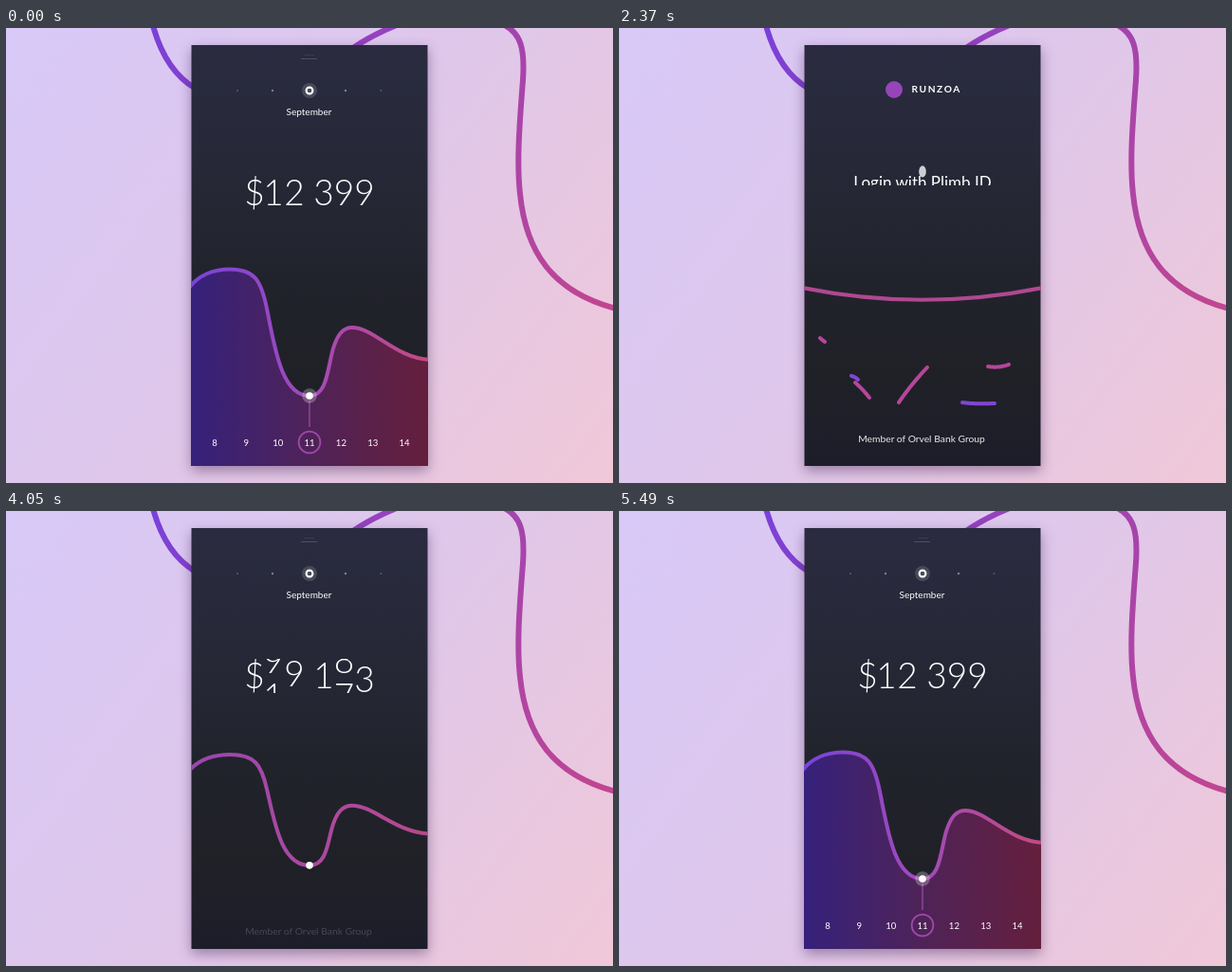
These frames come from a looping animation (640x480 px, 6090 ms). An HTML page:

```html
<!DOCTYPE html>
<html lang="en">
<head>
<meta charset="utf-8">
<title>Finance app login</title>
<style>
  html, body { margin: 0; width: 100%; height: 100%; overflow: hidden; }
  body { background: linear-gradient(115deg, #d8c9f8, #efc7d9); }
  svg { display: block; width: 640px; height: 480px; }
  text { font-family: Lato, sans-serif; fill: #fff; text-anchor: middle; }
  .round { fill: none; stroke-linecap: round; stroke-linejoin: round; }
  .card { filter: drop-shadow(0 5px 7px rgba(50, 20, 70, .42)); }
</style>
</head>
<body>
<svg viewBox="0 0 640 480">
  <defs>
    <linearGradient id="bg" gradientUnits="userSpaceOnUse" x1="0" y1="0" x2="640" y2="480">
      <stop stop-color="#d8c9f8"/><stop offset=".5" stop-color="#dfc7ea"/><stop offset="1" stop-color="#f0c8d8"/>
    </linearGradient>
    <linearGradient id="cable" gradientUnits="userSpaceOnUse" x1="150" y1="0" x2="640" y2="296">
      <stop stop-color="#7a40d8"/><stop offset="1" stop-color="#c24690"/>
    </linearGradient>
    <linearGradient id="panel" x2="0" y2="1">
      <stop stop-color="#2a2b40"/><stop offset=".25" stop-color="#272939"/>
      <stop offset=".55" stop-color="#21232c"/><stop offset=".78" stop-color="#202127"/>
      <stop offset="1" stop-color="#1c1d29"/>
    </linearGradient>
    <linearGradient id="area" gradientUnits="userSpaceOnUse" x1="195" y1="0" x2="445" y2="0">
      <stop stop-color="#36217b"/><stop offset=".2" stop-color="#40226d"/>
      <stop offset=".5" stop-color="#4f2358"/><stop offset="1" stop-color="#651f3d"/>
    </linearGradient>
    <linearGradient id="line" gradientUnits="userSpaceOnUse" x1="195" y1="0" x2="445" y2="0">
      <stop/><stop offset=".5"/><stop offset="1"/>
    </linearGradient>
    <clipPath id="inside"><rect x="195" y="18" width="250" height="444"/></clipPath>
    <clipPath id="reelBox"><rect x="240" y="156" width="160" height="36"/></clipPath>
    <clipPath id="titleBox"><rect id="titleRect" x="230" y="140" width="180" height="26"/></clipPath>
  </defs>

  <rect width="640" height="480" fill="url(#bg)"/>
  <path class="round" stroke="url(#cable)" stroke-width="6" d="M154-6C162 25 176 50 200 64M366 21C385 8 405-1 425-8M518-6C545 2 547 25 545 55C542 95 538 140 542 175C548 235 575 278 643 296"/>
  <rect class="card" x="195.5" y="18" width="249" height="444" fill="url(#panel)"/>

  <g clip-path="url(#inside)">
    <g id="login">
      <g id="brand">
        <circle cx="290" cy="65" r="9" fill="#9645b8"/>
        <text x="334.7" y="67.8" font-size="10.2" font-weight="700" letter-spacing="1.6">RUNZOA</text>
      </g>
      <g clip-path="url(#titleBox)"><text id="title" x="320" y="167" font-size="17">Login with Plimb ID</text></g>
      <g id="print"></g>
    </g>
    <text id="member" x="319" y="437" font-size="10.3" fill-opacity=".9">Member of Orvel Bank Group</text>

    <g id="main">
      <path id="fill" fill="url(#area)"/>
      <path id="stem" stroke="#8c4394" stroke-width="1.6"/>
      <path id="curve" class="round" stroke="url(#line)" stroke-width="4"/>
      <circle id="ring" cx="320" cy="437" fill="none" stroke="#a048a8" stroke-width="1.8"/>
      <g id="days"></g>
      <g id="handle" stroke="#fff"><path d="M315 28.5H325" opacity=".08"/><path d="M311 32.5H328" opacity=".17"/></g>
      <g id="month">
        <circle cx="320" cy="66" r="8" fill="#fff" opacity=".15"/>
        <circle cx="320" cy="66" r="3.4" fill="none" stroke="#fff" stroke-width="2.1"/>
        <g fill="#fff">
          <circle cx="244" cy="66" r=".9" opacity=".25"/><circle cx="281" cy="66" r="1.2" opacity=".4"/>
          <circle cx="358" cy="66" r="1.2" opacity=".4"/><circle cx="395.5" cy="66" r=".9" opacity=".25"/>
        </g>
        <text x="319.5" y="91.8" font-size="10">September</text>
      </g>
      <g id="sum" clip-path="url(#reelBox)" font-size="37" font-weight="300"><text x="262" y="187">$</text></g>
      <circle id="halo" cx="320" fill="#fff" fill-opacity=".25"/>
      <ellipse id="ball" cx="320" fill="#fff"/>
    </g>
  </g>
</svg>
<script>
const LOOP = 6090, LEVEL = 274, STEPS = 24;
const $ = id => document.getElementById(id);
const clamp = v => Math.max(0, Math.min(1, v));
const span = (t, a, b) => clamp((t - a) / (b - a));
const mix = (a, b, k) => a + (b - a) * k;
const smooth = k => k * k * (3 - 2 * k);
const out3 = k => 1 - (1 - k) ** 3;
const set = (el, attrs) => { for (const k in attrs) el.setAttribute(k, attrs[k]); };
const add = (parent, tag, attrs, text) => {
  const el = document.createElementNS('http://www.w3.org/2000/svg', tag);
  set(el, attrs);
  if (text !== undefined) el.textContent = text;
  return parent.appendChild(el);
};

// Ridges: ring index, start, end, pink. 0-180 is the arch in degrees; beyond it run the legs in px.
const ridges = [
  [8, 38, 117, 0], [8, -20, 26, 1], [8, 125, 182, 1],
  [7, 30, 98, 1], [7, 112, 206, 1], [7, -24, 22, 0],
  [6, 10, 66, 0], [6, 76, 222, 0], [6, -30, 0, 1],
  [5, -34, 74, 1], [5, 84, 124, 0], [5, 134, 228, 1],
  [4, -42, 150, 1], [4, 162, 234, 0],
  [3, -48, 60, 0], [3, 72, 236, 0],
  [2, -54, 110, 1], [2, 122, 240, 1],
  [1, -60, -12, 0], [1, 0, 240, 0], [0, 184, 242, 1]
];
// Ridges that fly off as short scraps: start, bend, end.
const scraps = {
  1: [212, 327, 214, 329, 217, 331],
  5: [245, 367, 249, 368, 252, 371],
  8: [249, 374, 257, 381, 264, 390],
  17: [325, 358, 308, 376, 295, 395],
  4: [389, 357, 400, 359, 411, 355],
  13: [362, 395, 375, 397, 396, 396]
};
const strands = ridges.map(r => add($('print'), 'path',
  { class: 'round', 'stroke-width': 4, stroke: r[3] ? '#b8479b' : '#8346d6' }));

function ridgePoint(ring, s) {
  const r = ring * 7.8;
  if (s < 0) return [320 - r - s * s * r * .0003, 300 - s];
  if (s > 180) { const d = s - 180; return [320 + r - d * d * r * .000065, 300 + d]; }
  const a = s * Math.PI / 180;
  return [320 - r * Math.cos(a), 300 - r * Math.sin(a)];
}
const bend = (a, b, c, k) => (1 - k) ** 2 * a + 2 * k * (1 - k) * b + k * k * c;

function drawPrint(t) {
  ridges.forEach(([ring, from, to], i) => {
    const scrap = scraps[i];
    const q = scrap ? span(t, 1600, 2370) : span(t, 1600 + i * 8, 2100 + i * 8);
    const e = smooth(q);
    const pts = [];
    for (let j = 0; j <= STEPS; j++) {
      const k = j / STEPS;
      const [x, y] = ridgePoint(ring, mix(from, to, k));
      const tx = scrap ? bend(scrap[0], scrap[2], scrap[4], k) : 195 + 250 * k;
      const ty = scrap ? bend(scrap[1], scrap[3], scrap[5], k) : LEVEL;
      const sway = scrap ? 0 : 20 * Math.sin(k * 6 + i) * Math.sin(Math.PI * e);
      pts.push(mix(x, tx, e).toFixed(1) + ' ' + (mix(y, ty, e) + sway).toFixed(1));
    }
    set(strands[i], {
      d: 'M' + pts.join('L'),
      opacity: scrap ? 1 - span(t, 2370, 2480) : 1 - span(q, .8, 1)
    });
  });
}

function chartPath(p) {
  const at = (x, y) => x + ' ' + mix(LEVEL, y, p).toFixed(2) + ' ';
  return 'M' + at(193, 274) +
    'C' + at(203, 261) + at(219, 254.5) + at(236, 254.5) +
    'C' + at(262, 254.5) + at(269, 266) + at(275, 296) +
    'C' + at(283, 335) + at(290, 388) + at(320, 388) +
    'C' + at(339, 388) + at(339, 358) + at(345, 338) +
    'C' + at(350, 322) + at(356, 316) + at(365, 316) +
    'C' + at(388, 316) + at(410, 348) + at(447, 350);
}

function stringSag(t) {
  if (t < 2230) return 28 * smooth(span(t, 2080, 2230));
  const d = t - 2230;
  return d > 1000 ? 0 : 28 * Math.exp(-d / 200) * Math.cos(d * 2 * Math.PI / 133);
}

function ballY(t, p) {
  if (t < 3330) return 274 - 228 * (1 - Math.exp(-(t - 2263) / 140)) + 8 * smooth(span(t, 2700, 3330));
  return t < 3650 ? mix(54, LEVEL, span(t, 3330, 3650) ** 2) : mix(LEVEL, 388, p);
}

const lineStops = [...$('line').children];
const pinkLine = [176, 72, 146];
const endLine = [[120, 68, 218], [162, 74, 184], [194, 74, 130]];

// Each reel: centre x, digits from bottom to top, place at 4050, at 4530, final place.
const reels = [
  [282, '0371941', 3.56, 6, 6],
  [304, '0358912', 3.95, 6, 6],
  [335, '0257123', 4, 6, 6],
  [356.5, '0357839', 3.56, 6.12, 6],
  [378, '123456789', 2.1, 7.18, 8]
].map(([x, digits, a, b, n]) => ({
  a, b, n, els: [...digits].map(c => add($('sum'), 'text', { x }, c))
}));

const days = [8, 9, 10, 11, 12, 13, 14].map((d, i) =>
  add($('days'), 'text', { x: 220 + i * 33.35, y: 440.6, 'font-size': 9.6 }, d));

function drawSum(t) {
  set($('sum'), { opacity: span(t, 3450, 3650) });
  for (const { a, b, n, els } of reels) {
    const pos = t < 4050 ? a * span(t, 3500, 4050)
      : t < 4530 ? mix(a, b, 1 - (1 - span(t, 4050, 4530)) ** 1.6)
      : mix(b, n, smooth(span(t, 4530, 4740)));
    els.forEach((el, i) => set(el, { y: (187 + (pos - i) * 38).toFixed(2) }));
  }
}

function drawMain(t) {
  const p = out3(span(t, 3650, 4450));
  const tint = span(t, 3750, 4500);
  lineStops.forEach((s, i) => set(s, {
    'stop-color': 'rgb(' + pinkLine.map((c, j) => Math.round(mix(c, endLine[i][j], tint))) + ')'
  }));
  const path = p ? chartPath(p) : `M193 ${LEVEL}Q320 ${LEVEL + 2 * stringSag(t)} 447 ${LEVEL}`;
  set($('curve'), { d: path, opacity: span(t, 2020, 2180) });
  set($('fill'), { d: chartPath(p) + 'V462H193Z', opacity: smooth(span(t, 4640, 5250)) });

  const y = ballY(t, p);
  const speed = t < 2263 ? 0 : Math.abs(ballY(t + 5, p) - ballY(t - 5, p)) / 10;
  const blur = p ? 0 : Math.min(1, speed);
  set($('ball'), { cy: y, rx: 3.8, ry: 3.8 + 3 * blur, opacity: t < 2263 ? 0 : 1 - .3 * blur });
  set($('halo'), { cy: y, r: mix(3.8, 7.8, out3(span(t, 4200, 4450))), opacity: span(t, 4200, 4400) });

  set($('stem'), { d: `M320 393V${mix(393, 421, out3(span(t, 4380, 4560)))}`, opacity: span(t, 4380, 4500) });
  set($('ring'), { r: 11.4 * out3(span(t, 4450, 4750)), opacity: .75 * span(t, 4450, 4570) + .25 * span(t, 4570, 4750) });
  days.forEach((el, i) => {
    const s = 4640 + Math.abs(i - 3) * 70;
    set(el, { opacity: span(t, s, s + 260) });
  });

  set($('handle'), { opacity: span(t, 2900, 3200) });
  const m = out3(span(t, 3400, 3700));
  set($('month'), { opacity: m, transform: `translate(0 ${-8 * (1 - m)})` });
  drawSum(t);
}

function draw(t) {
  const start = t < 600;
  const fade = start ? smooth(span(t, 30, 270)) : 1;
  set($('login'), { opacity: fade, visibility: t < 2800 ? 'visible' : 'hidden' });
  set($('main'), { opacity: start ? 1 - fade : 1 });

  drawPrint(t);
  set($('titleRect'), { height: t < 2340 ? 36 : 26 });
  set($('title'), { y: 167 + 24 * span(t, 2340, 2560) ** 1.3 });
  const gone = smooth(span(t, 2480, 2700));
  set($('brand'), { opacity: 1 - gone, transform: `translate(0 ${-10 * gone})` });

  const drop = smooth(span(t, 3650, 4210));
  set($('member'), { y: 437 + 13 * drop, opacity: fade * (1 - drop) });
  drawMain(start ? 6000 : t);
}

const begin = performance.now();
function tick() {
  draw((performance.now() - begin) % LOOP);
  requestAnimationFrame(tick);
}
draw(0);
requestAnimationFrame(tick);
</script>
</body>
</html>
```
